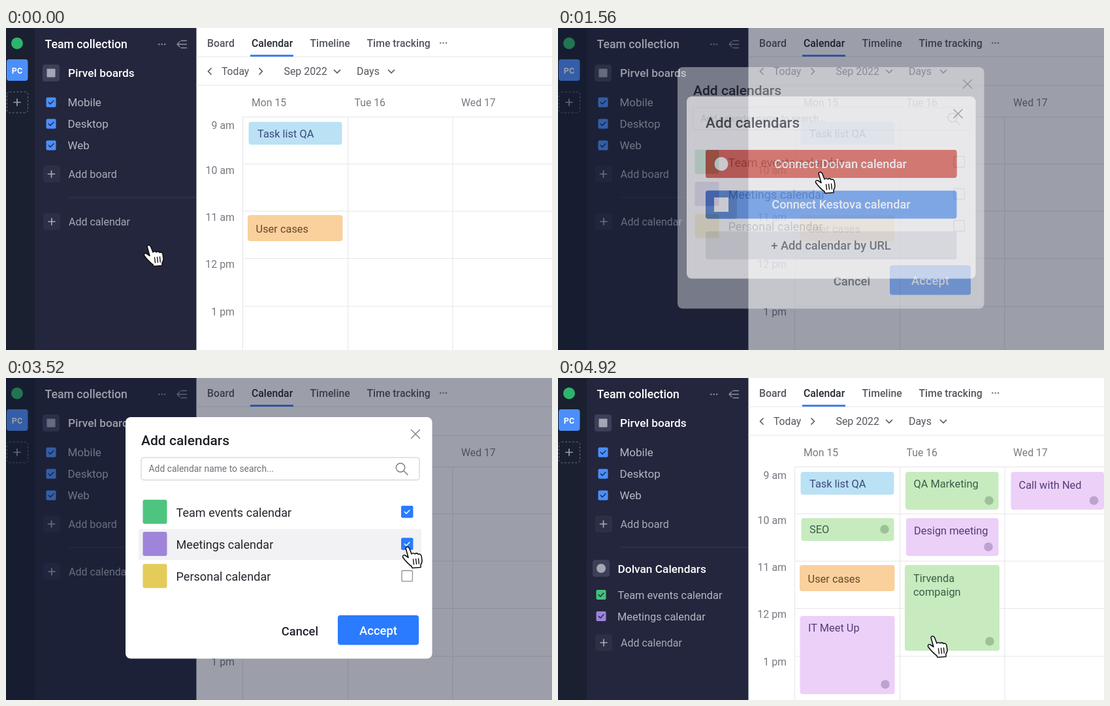
An HTML page that plays this animation: 836 px wide and 494 px high, repeating every 6080 ms.

```html
<!DOCTYPE html>
<html lang="en">
<head>
<meta charset="utf-8">
<title>Add calendars</title>
<style>
  html, body { margin: 0; width: 100%; height: 100%; overflow: hidden; background: #fff; }
  svg { display: block; width: 836px; height: 494px; font-family: Roboto, sans-serif; }
  .line { fill: none; stroke-linecap: round; stroke-linejoin: round; }
</style>
</head>
<body>
<svg id="stage" viewBox="0 0 836 494" xmlns="http://www.w3.org/2000/svg"></svg>
<script>
const LOOP = 6080, STEP = 40;
const BLUE = '#4c8ffb', GREEN = '#c7ebbe', PURPLE = '#ecd0f8';

// Shape helpers; text is placed by the vertical centre of its capitals.
const rect = (x, y, w, h, fill, r = 0, extra = '') =>
  `<rect x="${x}" y="${y}" width="${w}" height="${h}" rx="${r}" fill="${fill}" ${extra}/>`;
const circle = (x, y, r, fill, extra = '') =>
  `<circle cx="${x}" cy="${y}" r="${r}" fill="${fill}" ${extra}/>`;
const line = (d, color, width = 1.5, extra = '') =>
  `<path class="line" d="${d}" stroke="${color}" stroke-width="${width}" ${extra}/>`;
const text = (x, middle, value, size, fill, weight = 400, anchor = 'start') =>
  `<text x="${x}" y="${middle + size * 0.356}" font-size="${size}" fill="${fill}" font-weight="${weight}" text-anchor="${anchor}">${value}</text>`;
const group = (id, content) => `<g id="${id}">${content}</g>`;

const dots = (x, y, color) => [-4.4, 0, 4.4].map(d => circle(x + d, y, 1.2, color)).join('');
const plus = (x, y, color) => line(`M${x - 5} ${y}h10M${x} ${y - 5}v10`, color, 1.7);
const tick = (x, y, color) => line(`M${x - 3.8} ${y}l2.7 2.8l5-5.2`, color, 1.5);
const cross = (x, y) => line(`M${x - 6.5} ${y - 6.5}l13 13m0-13l-13 13`, '#777a82', 1.3);
const sideCheck = (x, y, color) => rect(x - 7.5, y - 7.5, 15, 15, color, 2) + tick(x, y, '#1f2947');

function rail() {
  return rect(0, 0, 45, 494, '#1a2030') +
    circle(17, 23.5, 9, '#2eb56c') +
    rect(1, 48, 32.5, 33, BLUE, 4) + text(17, 65.5, 'PC', 12.5, '#fff', 700, 'middle') +
    rect(1.5, 98, 32, 32, 'none', 4, 'stroke="#697084" stroke-dasharray="3 2.5"') +
    plus(17, 114, '#9aa0b0');
}

function sidebar() {
  const grey = '#a6a9b6';
  const boards = ['Mobile', 'Desktop', 'Web'].map((name, i) =>
    sideCheck(69, 114 + 33 * i, BLUE) + text(94.5, 114 + 33 * i, name, 17, '#b4b7c2'));
  return rect(44, 0, 248, 494, '#23263c') +
    text(59.5, 25, 'Team collection', 17.7, '#fff', 500) +
    dots(238.7, 25, '#8e92a3') +
    line('M266 21l-4 4l4 4M262 25h14.5M268 19.5h8.5M268 30.5h8.5', '#8e92a3', 1.3) +
    rect(56, 56, 26, 26, '#3c4057', 4) + rect(62.5, 62.5, 13, 13, '#a3a6b4', 1) +
    text(95, 69, 'Pirvel boards', 17.3, '#fff', 500) + boards.join('') +
    rect(57, 211, 26, 26, '#2c3047', 4) + plus(69.5, 224, grey) +
    text(95.5, 224, 'Add board', 16.2, grey) +
    rect(96, 259.5, 196, 1, '#393d52') +
    group('synced',
      rect(53, 279, 26, 26, '#3c4057', 4) + circle(66, 292, 7, '#a3a6b4') +
      text(91.5, 292.5, 'Dolvan Calendars', 17.3, '#fff', 500) +
      sideCheck(66, 332.5, '#43c27b') + text(91.5, 333, 'Team events calendar', 16.4, '#b4b7c2') +
      sideCheck(66, 365.5, '#9d82da') + text(91, 366, 'Meetings calendar', 16.4, '#b4b7c2')) +
    group('addCalendar',
      rect(57, 284, 26, 26, '#2c3047', 4) + rect(57, 284, 26, 26, '#565a70', 4, 'id="addHover"') +
      plus(70, 297, grey) + text(96, 297, 'Add calendar', 16, grey));
}

function card(x, y, w, h, fill, ink, textX, textY, lines, mark) {
  return rect(x, y, w, h, fill, 4) +
    lines.map((s, i) => text(textX, textY + 21 * i, s, 16.4, ink)).join('') +
    (mark ? circle(...mark, 6.8, ink, 'opacity=".3"') : '');
}

function calendar() {
  const ink = '#54575f', soft = '#777a82', grid = '#e6e5e9';
  const tabs = [[308, 'Board'], [376, 'Calendar'], [465.5, 'Timeline'], [552.5, 'Time tracking']]
    .map(([x, s]) => text(x, 23, s, 15.8, s === 'Calendar' ? '#222630' : ink, 500));
  const days = [[376, 'Mon 15'], [533.5, 'Tue 16'], [697, 'Wed 17']]
    .map(([x, s]) => text(x, 114.5, s, 15.8, soft));
  const hours = [[149, '9 am'], [218, '10 am'], [290, '11 am'], [362.5, '12 pm'], [435.5, '1 pm']]
    .map(([y, s]) => text(350, y, s, 15.9, soft, 400, 'end'));
  const rows = [136, 208, 280.5, 353, 426.5].map(y => rect(362, y, 474, 1, grid));
  const columns = [362, 523, 683.5].map(x => rect(x, 136, 1, 358, grid));
  const green = '#3c5d4a', violet = '#523d76';
  return rect(291.5, 0, 544.5, 494, '#fff') + tabs.join('') + dots(669.7, 23, soft) +
    rect(291.5, 43.5, 544.5, 1, '#e4e5e9') + rect(374, 41, 66, 3, '#3f80ee') +
    rect(291.5, 87.5, 544.5, 1, '#e4e5e9') +
    line('M314 62l-4.5 4.5l4.5 4.5M388 62l4.5 4.5l-4.5 4.5M502.500 64.500l4.500 4.500l4.500-4.500M585.500 64.500l4.500 4.500l4.500-4.500', ink, 1.7) +
    text(330, 66.500, 'Today', 15.700, ink) + text(425.500, 66.500, 'Sep 2022', 15.900, ink) +
    text(537, 66.500, 'Days', 16, ink) +
    days.join('') + hours.join('') + rows.join('') + columns.join('') +
    card(371.5, 144, 143, 35, '#bbe1f5', '#3a4a7c', 385, 162, ['Task list QA']) +
    card(370, 287, 145.5, 40, '#fad09d', '#674729', 382.5, 308, ['User cases']) +
    group('events',
      card(372.5, 215, 142, 35, GREEN, green, 385, 232.5, ['SEO'], [500, 232]) +
      card(370.5, 365, 145, 120, PURPLE, violet, 383, 383.5, ['IT Meet Up'], [501, 470]) +
      card(532, 144, 142.5, 58, GREEN, green, 544.5, 162, ['QA Marketing'], [660, 188]) +
      card(533, 215, 141.5, 58, PURPLE, violet, 545, 234.5, ['Design meeting'], [659, 259]) +
      card(531, 287, 145, 131.5, GREEN, green, 544, 307, ['Tirvenda', 'compaign'], [661, 404]) +
      card(693.5, 144, 142.5, 58, PURPLE, violet, 705.5, 164, ['Call with Ned'], [820.5, 188]));
}

function connectDialog() {
  const button = (y, fill, iconFill, icon) =>
    rect(226, y, 384.5, 43, fill, 4) + rect(226, y, 48, 43, iconFill, 4) + icon;
  return rect(197, 105, 442.5, 279.5, '#fff', 8) +
    text(226, 145, 'Add calendars', 22.4, '#23262d', 500) + cross(612.5, 131.5) +
    button(187, '#e05a55', '#d44640', '') +
    rect(226, 187, 384.5, 43, '#da4438', 4, 'id="redHover"') + circle(250, 208.5, 10.5, '#fff') +
    button(249.5, '#5090f6', '#3c76d0', rect(239, 260, 22, 22, '#fff')) +
    rect(226, 312, 384.5, 43, '#e3e4e8', 4) +
    text(432.5, 208.5, 'Connect Dolvan calendar', 18.2, '#fff', 500, 'middle') +
    text(433.5, 271, 'Connect Kestova calendar', 18.2, '#fff', 500, 'middle') +
    text(418, 334, '+ Add calendar by URL', 18.2, '#3f4249', 500, 'middle');
}

function pickDialog() {
  const rows = [['Team events calendar', '#4dc57f'], ['Meetings calendar', '#9f85d9'], ['Personal calendar', '#e5cc59']];
  const list = rows.map(([name, color], i) => {
    const y = 205.3 + 49.2 * i;
    return rect(203, y - 22.8, 433, 47.5, '#f2f1f3', 0, `id="row${i}"`) +
      rect(209.5, y - 18.5, 37, 37, color, 3) + text(260.5, y + 1, name, 18.1, '#23262d') +
      rect(606, y - 8.2, 16.4, 16.4, '#fff', 2, 'stroke="#8b8e95" stroke-width="1.3"') +
      group('check' + i, rect(605, y - 9.2, 18.4, 18.4, '#297bff', 2) + tick(614, y, '#fff'));
  });
  return rect(183, 60, 469.5, 370.5, '#fff', 8) +
    text(207, 95.5, 'Add calendars', 21, '#1d2026', 500) + cross(627, 86) +
    rect(207, 122, 426, 34.5, '#fff', 4, 'stroke="#c6c9ce"') +
    text(218.5, 139.5, 'Add calendar name to search...', 13.9, '#70737b') +
    circle(604, 137.5, 6.7, 'none', 'stroke="#777a82" stroke-width="1.4"') +
    line('M609 142.500l6 6', '#777a82', 1.4) + list.join('') +
    text(450, 388, 'Cancel', 18.4, '#23262d', 500, 'middle') +
    rect(508, 364, 124, 45.5, '#2a7bff', 4) + rect(508, 364, 124, 45.5, '#1b62df', 4, 'id="acceptHover"') +
    text(570, 387, 'Accept', 18.4, '#fff', 500, 'middle');
}

const hand = `<path d="M6 4Q8 0 11.500 4L15 13Q17.500 10.500 20 13Q23 10.500 25 13.500Q28.500 12 30 16L31 23Q31 27 29 29.500V33.500L16 34.500L15 32Q8 27 1.500 18Q1 14 5 15L10 18.500Z"
  fill="#fff" stroke="#111" stroke-width="1.6" stroke-linejoin="round"/>` +
  line('M17.500 21l1 8M21.500 20.500l1 8M25.500 20l.8 8', '#111', 1.4);

const stage = document.getElementById('stage');
stage.innerHTML = rail() + sidebar() + calendar() +
  rect(0, 0, 836, 494, '#141c32', 0, 'id="shade"') +
  group('pick', pickDialog()) + group('connect', connectDialog()) + group('cursor', hand);

const part = {};
stage.querySelectorAll('[id]').forEach(el => part[el.id] = el);

const ramp = (t, from, to) => Math.min(1, Math.max(0, (t - from) / (to - from)));
const smooth = p => p * p * (3 - 2 * p);
const during = (t, from, to) => +(t >= from && t < to);
const show = (id, opacity) => part[id].setAttribute('opacity', opacity);
const move = (id, x, y) => part[id].setAttribute('transform', `translate(${x} ${y})`);

// Cursor moves: start time, end time, destination.
const moves = [[0, 280, 136, 300], [880, 1200, 393, 219], [2360, 2680, 606, 208],
               [3000, 3280, 606, 257], [3680, 3960, 565, 394]];

function draw(t) {
  let x = 210, y = 331;
  for (const [from, to, endX, endY] of moves) {
    const p = smooth(ramp(t, from, to));
    x += (endX - x) * p;
    y += (endY - y) * p;
  }
  move('cursor', x, y);

  const opened = ramp(t, 510, 600), swapped = ramp(t, 1520, 1620), closed = ramp(t, 4727, 4920);
  show('shade', 0.42 * opened * (1 - closed));
  show('connect', opened * (1 - swapped));
  show('pick', swapped * (1 - closed));
  show('synced', closed);
  show('events', ramp(t, 4760, 4920));
  move('addCalendar', 0, 109 * closed);

  show('addHover', during(t, 200, 960));
  show('redHover', ramp(t, 1080, 1200));
  show('row0', ramp(t, 1840, 2000) * during(t, 0, 3160));
  show('row1', during(t, 3160, 3800));
  show('row2', 0);
  show('check0', ramp(t, 2760, 2880));
  show('check1', ramp(t, 3400, 3520));
  show('check2', 0);
  show('acceptHover', ramp(t, 4040, 4120));
}

const start = performance.now();
function tickFrame() {
  const elapsed = (performance.now() - start) % LOOP;
  draw(Math.floor(elapsed / STEP) * STEP);
  requestAnimationFrame(tickFrame);
}
tickFrame();
</script>
</body>
</html>
```
